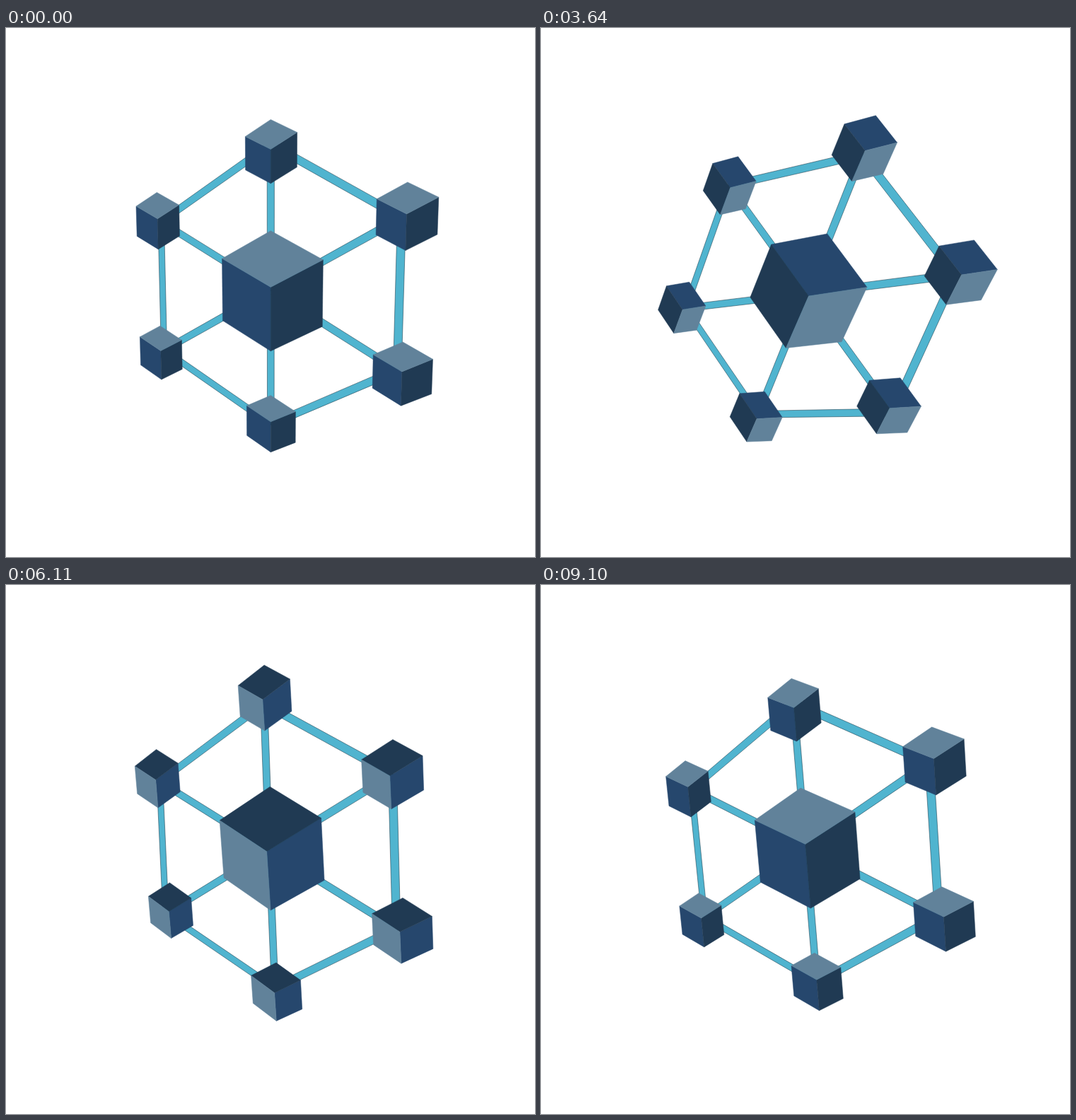
An HTML page with a canvas that plays this animation: 748 px wide and 748 px high, repeating every 9230 ms.

```html
<!DOCTYPE html>
<html lang="en">
<head>
<meta charset="utf-8">
<title>Cube network</title>
<style>
  html, body { margin: 0; width: 100%; height: 100%; overflow: hidden; background: #fff; }
  canvas { display: block; }
</style>
</head>
<body>
<canvas id="stage" width="748" height="748"></canvas>
<script>
const ctx = document.getElementById('stage').getContext('2d');
const STEP = 130, STEPS = 71, OX = 374.3, OY = 373.4;
const LINK = '#50b4cf', EDGE = 'rgba(20,50,65,.65)';
const LIGHT = '#61829a', BLUE = '#26476d', DARK = '#203a53';

// The flat drawing spins in a plane that is turned and pitched in perspective.
const DEPTH = 666, TURN = 19.27 * Math.PI / 180, PITCH = 5.93 * Math.PI / 180;
const [ct, st, cp, sp] = [Math.cos(TURN), Math.sin(TURN), Math.cos(PITCH), Math.sin(PITCH)];
let ca = 1, sa = 0;

function project([px, py]) {
  const x = px * ca - py * sa, y = px * sa + py * ca;
  const z = x * st;
  const scale = DEPTH / (DEPTH - z * cp + y * sp);
  return [OX + x * ct * scale, OY + (y * cp + z * sp) * scale];
}

function polygon(points, fill, stroke = fill, width = 0.5) {
  ctx.beginPath();
  points.forEach(p => ctx.lineTo(...project(p)));
  ctx.closePath();
  ctx.fillStyle = fill;
  ctx.fill();
  ctx.strokeStyle = stroke;
  ctx.lineWidth = width;
  ctx.stroke();
}

function link([x1, y1], [x2, y2]) {
  const k = 5.25 / Math.hypot(x2 - x1, y2 - y1);
  const nx = (y1 - y2) * k, ny = (x2 - x1) * k;
  polygon([[x1 + nx, y1 + ny], [x2 + nx, y2 + ny], [x2 - nx, y2 - ny], [x1 - nx, y1 - ny]],
    LINK, EDGE, 0.8);
}

function cube(cx, cy, size) {
  const at = (x, y) => [cx + x * size, cy + y * size];
  const near = at(0, -7), top = at(0, -86), bottom = at(0, 85);
  const left = at(-75, -46.5), right = at(75, -46.5);
  polygon([near, left, at(-75, 45), bottom], BLUE);
  polygon([near, right, at(75, 45), bottom], DARK);
  polygon([near, left, top, right], LIGHT);
}

const hub = [0, -2.7];
const corners = [[0, -203.5], [176, -101], [176, 97], [0, 193.5], [-176, 97], [-176, -101]];
const nodes = [[0, -193.3], [182, -102], [182, 102], [0, 193.3], [-182, 102], [-182, -102]];

function draw(now) {
  const angle = Math.floor(now / STEP) % STEPS / STEPS * 2 * Math.PI;
  ca = Math.cos(angle);
  sa = Math.sin(angle);
  ctx.fillStyle = '#fff';
  ctx.fillRect(0, 0, 748, 748);
  corners.forEach((p, i) => {
    link(p, corners[(i + 1) % 6]);
    link(hub, p);
  });
  nodes.forEach(([x, y]) => cube(x, y, 0.5));
  cube(0, 0, 1);
}

const start = performance.now();
function tick() {
  draw(performance.now() - start);
  requestAnimationFrame(tick);
}
tick();
</script>
</body>
</html>
```
